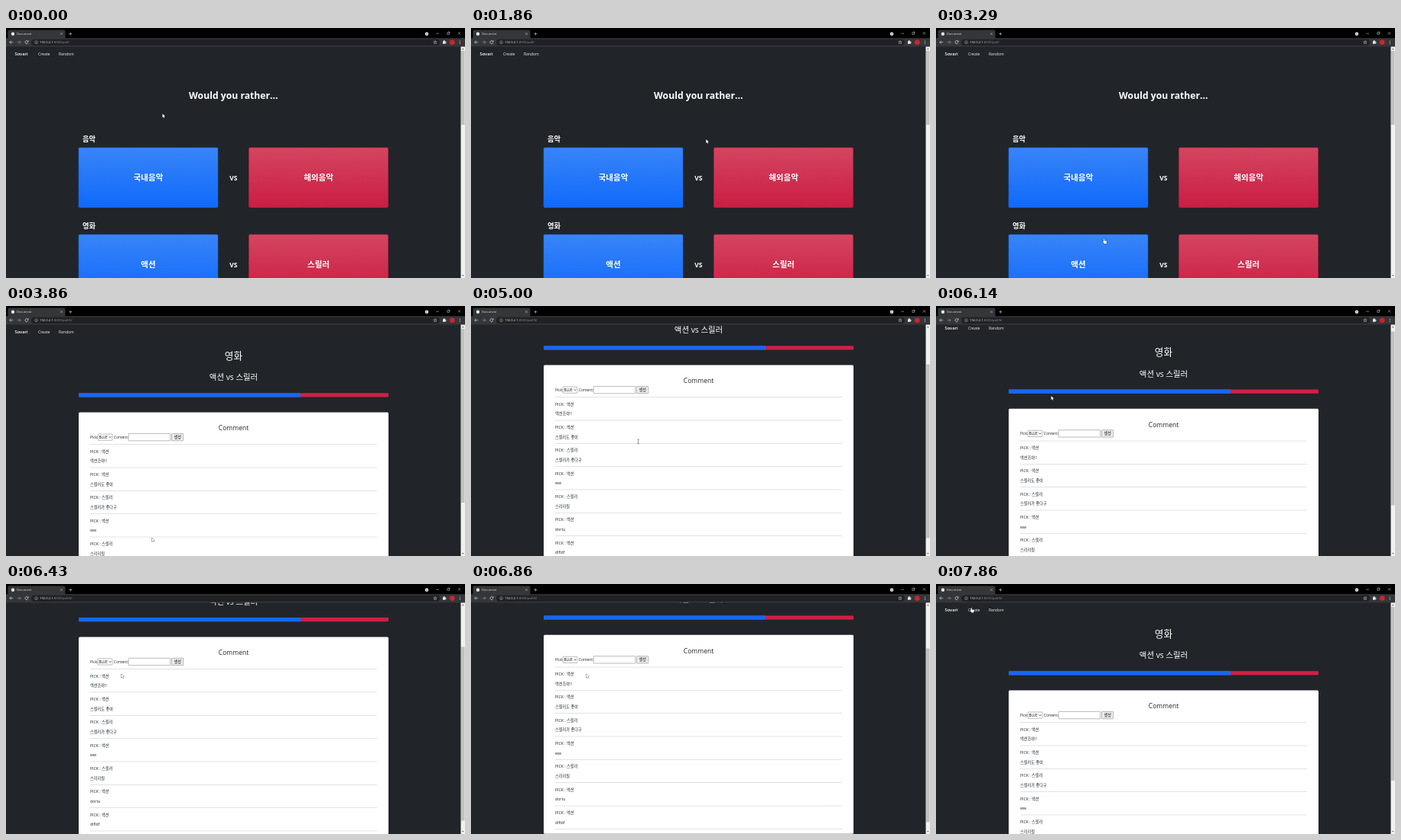
Animation, 600 px wide and 328 px high, one loop 8 s. Source, as an HTML page with a canvas:

```html
<!DOCTYPE html>
<html lang="ko">
<head>
<meta charset="utf-8">
<title>Document</title>
<style>
html, body { margin: 0; width: 100%; height: 100%; overflow: hidden; background: #212529; }
canvas { display: block; width: 600px; height: 328px; }
</style>
</head>
<body>
<canvas id="stage"></canvas>
<script>
const LOOP = 8000, PAGE_SWITCH = 3710, TOP = 24.5;
const FONT = '"Open Sans", "Noto Sans CJK KR", "Noto Sans CJK", sans-serif';
const DARK = '#212529';
const canvas = document.getElementById('stage');
const g = canvas.getContext('2d');
const dpr = window.devicePixelRatio || 1;
canvas.width = 600 * dpr;
canvas.height = 328 * dpr;

// Key points: time, then values
const cursorPath = [
  [0, 204.5, 112.5], [70, 204.5, 112.5], [570, 248, 130], [800, 248, 130],
  [860, 252, 131], [1400, 252, 131], [1860, 307.3, 146], [2430, 298, 200],
  [2520, 298, 200], [3570, 190.5, 304], [3870, 190.5, 304], [4430, 218.7, 175],
  [5430, 218.7, 175], [5860, 150.5, 118], [7290, 150.5, 118], [7800, 45.6, 31]
];
const scrollPath = [
  [4790, 0], [5000, 62], [5140, 62], [5290, 24], [5430, 0], [6080, 0], [6140, 4.5],
  [6430, 70], [6570, 84], [6790, 84], [6860, 73], [7000, 40], [7290, 0]
];
const comments = [
  ['액션', '액션조아!!'], ['액션', '스릴러도 좋아'], ['스릴러', '스릴러가 좋다구'],
  ['액션', 'ww'], ['스릴러', '스리리릴'], ['액션', 'dortu'], ['액션', 'dlfldf']
];

function along(path, t) {
  const i = path.findIndex(k => k[0] > t);
  if (i === 0) return path[0].slice(1);
  if (i < 0) return path[path.length - 1].slice(1);
  const a = path[i - 1], b = path[i], p = (t - a[0]) / (b[0] - a[0]);
  return a.slice(1).map((v, n) => v + (b[n + 1] - v) * p);
}

function rect(x, y, w, h, fill, radius = 0, stroke) {
  g.beginPath();
  g.roundRect(x, y, w, h, radius);
  if (fill) { g.fillStyle = fill; g.fill(); }
  if (stroke) { g.strokeStyle = stroke; g.lineWidth = .5; g.stroke(); }
}

function circle(x, y, r, fill) {
  g.beginPath();
  g.arc(x, y, r, 0, 7);
  g.fillStyle = fill;
  g.fill();
}

function line(points, color, width = .6) {
  g.beginPath();
  for (let i = 0; i < points.length; i += 2) g.lineTo(points[i], points[i + 1]);
  g.strokeStyle = color;
  g.lineWidth = width;
  g.stroke();
}

// y is the middle of the line of text
function text(str, x, y, size, color, weight = 400, align = 'left') {
  g.font = `${weight} ${size}px ${FONT}`;
  g.textAlign = align;
  g.fillStyle = color;
  g.fillText(str, x, y + size * .36);
}

const heading = (str, x, y, size, weight) => text(str, x, y, size, '#fff', weight, 'center');

function drawBrowser(path) {
  rect(0, 0, 600, 14, '#000');
  rect(2.5, 2.5, 75, 13, '#35363a', 2);
  rect(0, 13.3, 600, 11.2, '#35363a');
  rect(33, 14.8, 534, 8.2, '#202124', 4);
  circle(9, 7.7, 2.2, '#e4e5e7');
  text('Document', 14, 7.8, 4, '#dfe1e5');
  line([71, 6.2, 74, 9.2], '#ccc', .5);
  line([74, 6.2, 71, 9.2], '#ccc', .5);
  line([82.3, 7.7, 86.3, 7.7], '#ddd');
  line([84.3, 5.7, 84.3, 9.7], '#ddd');

  circle(550, 7.7, 2.3, '#e8e8e8');
  line([549, 7.2, 550, 8.4, 551, 7.2], '#222', .6);
  line([562, 7.2, 566, 7.2], '#ddd', .5);
  rect(576.8, 5.8, 2.6, 2.6, null, 0, '#ddd');
  line([577.8, 5.1, 580.1, 5.1, 580.1, 7.4], '#ddd', .4);
  line([590.8, 5.2, 594.2, 8.6], '#ddd', .5);
  line([594.2, 5.2, 590.8, 8.6], '#ddd', .5);

  for (const [x, dir, color] of [[7, -1, '#e8eaed'], [17, 1, '#9a9da1']]) {
    line([x - 2.3 * dir, 18.6, x + 2.3 * dir, 18.6], color);
    line([x, 16.4, x + 2.2 * dir, 18.6, x, 20.8], color);
  }
  g.beginPath();
  g.arc(27, 18.6, 2, .5, 5.5);
  g.strokeStyle = '#e8eaed';
  g.lineWidth = .7;
  g.stroke();
  line([29.2, 16.3, 29.2, 18.2, 27.3, 18.2], '#e8eaed');
  g.beginPath();
  g.arc(39.5, 18.7, 1.9, 0, 7);
  g.strokeStyle = '#bdc1c6';
  g.lineWidth = .5;
  g.stroke();
  line([39.5, 18.3, 39.5, 19.8], '#bdc1c6', .5);
  text('192.0.2.1', 44, 18.8, 4.2, '#eee');
  text(':8000' + path, 44 + g.measureText('192.0.2.1').width, 18.8, 4.2, '#8f9398');

  g.beginPath();
  for (let i = 0; i < 10; i++) {
    const r = i % 2 ? 1 : 2.3, a = i * Math.PI / 5 - Math.PI / 2;
    g.lineTo(561 + r * Math.cos(a), 18.8 + r * Math.sin(a));
  }
  g.closePath();
  g.strokeStyle = '#ddd';
  g.lineWidth = .5;
  g.stroke();
  rect(571, 17.2, 3.6, 3.6, '#e8eaed', .4);
  circle(572.8, 16.9, .8, '#e8eaed');
  circle(574.9, 19, .8, '#e8eaed');
  circle(583.3, 18.7, 3.3, '#d3222a');
  for (let i = -1; i < 2; i++) circle(593.3, 18.7 + i * 1.7, .5, '#e8eaed');
}

function drawScrollbar(y, h) {
  rect(594.5, TOP, 5.5, 304, '#f1f1f1');
  rect(595, y, 4.5, h, '#c1c1c1');
  for (const [y0, y1] of [[28.2, 26.6], [324, 325.6]]) {
    g.beginPath();
    g.moveTo(596, y0);
    g.lineTo(598.6, y0);
    g.lineTo(597.3, y1);
    g.fillStyle = '#555';
    g.fill();
  }
}

function drawNav() {
  text('Sovari', 11.5, 33.7, 5.8, '#fff', 600);
  text('Create', 42, 33.7, 5, '#f4f4f4');
  text('Random', 69, 33.7, 5, '#f4f4f4');
}

function choice(x, y, label, from, to) {
  const fill = g.createLinearGradient(0, y, 0, y + 78);
  fill.addColorStop(0, from);
  fill.addColorStop(1, to);
  rect(x, y, 182, 78.5, fill, 1.5, to);
  heading(label, x + 91, y + 39.3, 10.5, 700);
}

function drawVotes() {
  drawNav();
  heading('Would you rather...', 297.3, 89, 12.2, 700);
  [['음악', '국내음악', '해외음악'], ['영화', '액션', '스릴러']].forEach(([title, left, right], i) => {
    const y = 157 + i * 114;
    text(title, 100, y - 11.5, 9.3, '#fff', 700);
    choice(95, y, left, '#3984f8', '#0f6afa');
    choice(317.5, y, right, '#d44560', '#cb1d43');
    heading('VS', 297.3, y + 39.5, 8.5, 700);
  });
}

function drawDetail() {
  drawNav();
  heading('영화', 297.5, 65, 12.7);
  heading('액션 vs 스릴러', 297.5, 93.5, 10.4);
  rect(95, 114.2, 405, 5.2, '#d01f46', 1);
  rect(95, 114.2, 290, 5.2, '#1169f7', [1, 0, 0, 1]);

  rect(95, 139.5, 405, 261, '#fff', 1.5);
  text('Comment', 297.5, 160.3, 8.5, DARK, 400, 'center');
  text('Pick:', 110, 172.2, 4.9, DARK);
  rect(120.2, 168, 18.8, 8.2, '#fff', .5, '#767676');
  text('BLUE', 121.5, 172.2, 4.6, '#000');
  line([134.8, 171.4, 136.1, 172.8, 137.4, 171.4], '#111', .7);
  text('Content:', 140.8, 172.2, 4.9, DARK);
  rect(160.2, 167.4, 54.6, 9.4, '#fff', .3, '#767676');
  rect(216.6, 167.4, 15.2, 9.4, '#efefef', .6, '#767676');
  text('생성', 224.2, 172.2, 5.2, '#000', 400, 'center');

  const rule = y => rect(110, y, 375, .5, '#c4c6c8');
  rule(181.4);
  comments.forEach(([pick, body], i) => {
    const y = 190.8 + i * 30.35;
    text('PICK : ' + pick, 110, y, 5.2, DARK);
    text(body, 110, y + 12.7, 5.2, DARK);
    rule(y + 21);
  });
}

function drawCursor(x, y, kind) {
  g.save();
  g.translate(x, y);
  if (kind === 'beam') {
    line([-1, 0, 1, 0], '#222', .5);
    line([0, 0, 0, 5.6], '#222', .5);
    line([-1, 5.6, 1, 5.6], '#222', .5);
  } else {
    const shape = kind === 'hand'
      ? 'M0 .6Q.6-.3 1.2.6V2.6L3.6 3.1Q4.3 3.4 4.2 4.2L3.6 6.6H1L-1 4.2Q-1 3.2 0 3.8Z'
      : 'M0 0V5L1.2 3.9L2 5.7L2.8 5.3L2 3.6H3.6Z';
    const path = new Path2D(shape);
    g.strokeStyle = '#111';
    g.lineWidth = .6;
    g.stroke(path);
    g.fillStyle = '#fff';
    g.fill(path);
  }
  g.restore();
}

function cursorKind(t, x, y) {
  if (t < PAGE_SWITCH) {
    const overColumn = (x > 95 && x < 277) || (x > 317 && x < 500);
    const overRow = (y > 157 && y < 235) || y > 271;
    return overColumn && overRow ? 'hand' : 'arrow';
  }
  if (t > 4350 && t < 5500) return 'beam';
  return x < 57 && y < 38 ? 'hand' : 'arrow';
}

function draw(t) {
  const detail = t >= PAGE_SWITCH;
  const [scroll] = along(scrollPath, t);
  const [x, y] = along(cursorPath, t);
  g.setTransform(dpr, 0, 0, dpr, 0, 0);
  rect(0, 0, 600, 328, DARK);
  g.save();
  g.translate(0, -scroll);
  detail ? drawDetail() : drawVotes();
  g.restore();
  drawBrowser(detail ? '/poll/6/' : '/poll/');
  drawScrollbar(30 + scroll * .75, detail ? 228 : 97);
  drawCursor(x, y, cursorKind(t, x, y));
}

const start = performance.now();
function tick() {
  draw((performance.now() - start) % LOOP);
  requestAnimationFrame(tick);
}
tick();
</script>
</body>
</html>
```
